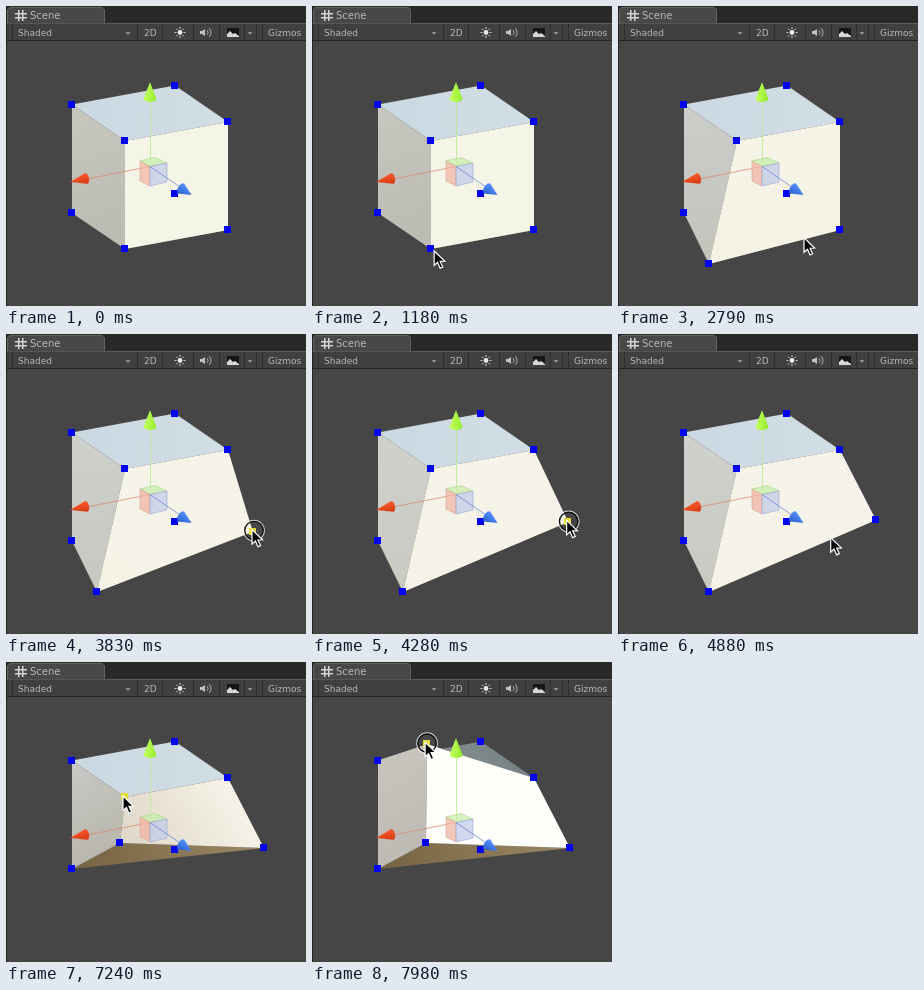
An HTML page with a canvas for the animation above (8 s loop, 300 by 300 pixels).

```html
<!DOCTYPE html>
<html lang="en">
<head>
<meta charset="utf-8">
<title>Scene</title>
<style>
html, body { margin: 0; width: 100%; height: 100%; overflow: hidden; background: #464646; }
canvas { display: block; width: 300px; height: 300px; }
</style>
</head>
<body>
<canvas id="stage" width="300" height="300"></canvas>
<script>
const ctx = document.getElementById('stage').getContext('2d');
const LOOP = 8000, START = 725, STEP = 147.5;

const cube = {
  A: [66, 98.5], B: [169, 79.5], C: [222, 116], D: [119, 135],
  E: [66, 207], F: [119, 243], G: [222, 224], H: [169, 188],
};

// The cursor leaves, reaches a corner, presses it and pulls it until the end step.
const drags = [
  { corner: 'F', from: cube.F, to: [91, 258], leave: 0, reach: 4, press: 5, end: 10 },
  { corner: 'G', from: cube.G, to: [258, 186], leave: 10, reach: 16, press: 17, end: 26 },
  { corner: 'F', from: [91, 258], to: [114, 181], bow: 13, leave: 26, reach: 32, press: 33, end: 39 },
  { corner: 'D', from: cube.D, to: [115, 80], leave: 40, reach: 44, press: 45, end: 50 },
];
const CURSOR_ENTRY = [152, 262];

// Colours of both ends of each face's gradient, before and after each drag.
const shades = {
  top: [['#cad8e1', '#cad8e1', '#cad8e1', '#cad8e1', '#84908f'], ['#d2dee6', '#d2dee6', '#d2dee6', '#d2dee6', '#717d80']],
  left: [['#c7c6bf', '#cccecb', '#cfd1cd', '#c8c9c6', '#c6c4bd'], ['#bbbab2', '#c3c3bb', '#c9cac2', '#b9b7ad', '#bdbbb4']],
  front: [['#f5f5e7', '#f3f2e4', '#f5f3e7', '#ded6c8', '#fffffb'], ['#f5f5e7', '#f5f4e6', '#f6f4ea', '#f7f3e8', '#fffffc']],
  bottom: [['#766343'], ['#9b8864']],
};

const clamp = u => Math.min(1, Math.max(0, u));
const smooth = u => u * u * (3 - 2 * u);
const easeOut = u => 1 - (1 - u) ** 2;
const mix = (a, b, u) => a.map((v, i) => v + (b[i] - v) * u);
const rgb = hex => [1, 3, 5].map(i => parseInt(hex.slice(i, i + 2), 16));

const progress = (drag, step) => easeOut(clamp((step - drag.press) / (drag.end - drag.press)));

function dragged(drag, step) {
  const u = progress(drag, step), [x, y] = mix(drag.from, drag.to, u);
  return [x + (drag.bow || 0) * Math.sin(Math.PI * u), y];
}

function cursorAt(step) {
  const index = drags.findLastIndex(d => step >= d.leave);
  const drag = drags[index];
  const origin = index ? drags[index - 1].to : CURSOR_ENTRY;
  const travel = smooth(clamp((step - drag.leave) / (drag.reach - drag.leave)));
  const [x, y] = mix(origin, dragged(drag, step + 0.25), travel);
  return [x - 2, y - 1];
}

function stageColor(colors, stage) {
  const last = colors.length - 1, i = Math.min(Math.floor(stage), last);
  const color = mix(rgb(colors[i]), rgb(colors[Math.min(i + 1, last)]), stage % 1);
  return `rgb(${color.map(Math.round)})`;
}

function trace(points) {
  ctx.beginPath();
  points.forEach(p => ctx.lineTo(...p));
}
function polygon(points, fill, stroke, width = 1) {
  trace(points);
  ctx.closePath();
  ctx.fillStyle = fill;
  ctx.fill();
  if (stroke) { ctx.strokeStyle = stroke; ctx.lineWidth = width; ctx.stroke(); }
}
function line(points, color, width = 1) {
  trace(points);
  ctx.strokeStyle = color;
  ctx.lineWidth = width;
  ctx.stroke();
}
function arc(x, y, r, color, width, from = 0, to = 7) {
  ctx.beginPath();
  ctx.arc(x, y, r, from, to);
  ctx.strokeStyle = color;
  ctx.lineWidth = width;
  ctx.stroke();
}
function rect(x, y, w, h, color) {
  ctx.fillStyle = color;
  ctx.fillRect(x, y, w, h);
}
function text(label, x, y, size) {
  ctx.font = `${size}px "DejaVu Sans", sans-serif`;
  ctx.fillStyle = '#b8b8b8';
  ctx.fillText(label, x, y);
}
function gradient(from, to, colors) {
  const g = ctx.createLinearGradient(...from, ...to);
  colors.forEach((color, i) => g.addColorStop(i, color));
  return g;
}

function drawToolbar() {
  rect(0, 0, 300, 18, '#292929');
  rect(0, 17, 300, 18, '#404040');
  rect(0, 17, 300, 1, '#5c5c5c');
  polygon([[1.5, 18], [1.5, 3.5], [3.5, 1.5], [96.5, 1.5], [98.5, 3.5], [98.5, 18]], '#484848', '#626262');
  rect(0, 18, 300, 16, '#404040');
  rect(0, 34, 300, 1, '#242424');
  rect(0, 0, 1, 300, '#222');
  for (const x of [6, 131, 156, 187, 213, 238, 250, 256]) rect(x, 18, 1, 16, '#2e2e2e');

  for (const offset of [0, 4]) {
    rect(12 + offset, 4, 1.5, 11, '#d4d4d4');
    rect(9, 7 + offset, 12, 1.5, '#d4d4d4');
  }
  text('Scene', 24, 13, 10);
  text('Shaded', 12, 30, 9);
  text('2D', 138, 30, 9);
  text('Gizmos', 262, 30, 9);
  for (const x of [122, 244]) polygon([[x - 2.5, 26], [x + 2.5, 26], [x, 29]], '#8e8e8e');

  arc(174, 26.5, 1.2, '#eee', 2.4);
  for (let i = 0; i < 8; i++) {
    const ray = r => [174 + r * Math.cos(i * Math.PI / 4), 26.5 + r * Math.sin(i * Math.PI / 4)];
    line([ray(3.5), ray(5.5)], '#d0d0d0');
  }
  polygon([[194, 25], [196, 25], [199, 23], [199, 30], [196, 28], [194, 28]], '#c0c0c0');
  for (const r of [3, 6]) arc(199, 26.5, r, '#b4b4b4', 1, -0.8, 0.8);
  rect(221, 22, 12, 9, '#161616');
  polygon([[221, 31], [221, 28], [224, 25], [227, 28], [229, 27], [233, 30], [233, 31]], '#d8d8d8');
}

function cone(tip, base, radius, colors) {
  const dx = tip[0] - base[0], dy = tip[1] - base[1];
  ctx.save();
  ctx.translate(...base);
  ctx.rotate(Math.atan2(dy, dx));
  ctx.beginPath();
  ctx.moveTo(Math.hypot(dx, dy), 0);
  ctx.ellipse(0, 0, 3, radius, 0, Math.PI / 2, Math.PI * 1.5);
  ctx.closePath();
  ctx.fillStyle = gradient([0, -radius], [0, radius], colors);
  ctx.fill();
  ctx.restore();
}

function drawGizmo() {
  const center = [144, 160.5];
  line([[144.5, 160], [144.5, 94]], '#bce98a', 0.8);
  line([center, [81, 173]], '#dc8878', 0.8);
  polygon([[134, 155], [149, 151.5], [161, 157], center], 'rgba(200,238,172,.75)', '#a9d488', 0.6);
  polygon([[134, 155], center, [144, 180], [134, 175]], 'rgba(240,180,165,.75)', '#d9a698', 0.6);
  polygon([center, [161, 157], [161, 176], [144, 180]], 'rgba(195,203,234,.75)', '#98a4d2', 0.6);
  line([center, [174, 181]], '#6c8bd6', 0.8);
  cone([144, 76], [144, 93], 6.5, ['#c6ff62', '#92ec2c']);
  cone([64, 176], [80, 172.5], 5.5, ['#d03a14', '#ff5a2c']);
  cone([185.5, 189], [175, 182.5], 6, ['#5594ff', '#2a5fd0']);
}

function drawCursor([x, y], pressed) {
  if (pressed) {
    arc(x + 2, y + 1, 10.3, 'rgba(255,255,255,.75)', 1.2);
    arc(x + 2, y + 1, 9.2, '#111', 1.4);
  }
  const arrow = [[0, 0], [0, 14.5], [3.4, 11.4], [6, 17.2], [8.6, 16], [6, 10.4], [10.6, 10.2]];
  polygon(arrow.map(([dx, dy]) => [x + dx, y + dy]), '#000', '#fff', 1.2);
}

function draw(time) {
  const step = Math.floor((time - START) / STEP);
  const corners = { ...cube };
  for (const drag of drags) {
    if (step >= drag.press) corners[drag.corner] = dragged(drag, step);
  }
  const { A, B, C, D, E, F, G } = corners;
  const stage = drags.reduce((sum, drag) => sum + progress(drag, step), 0);
  const face = (points, from, to, ends) =>
    polygon(points, gradient(from, to, ends.map(colors => stageColor(colors, stage))));

  rect(0, 0, 300, 300, '#464646');
  drawToolbar();
  face([A, B, C, D], A, C, shades.top);
  face([E, F, G], E, G, shades.bottom);
  face([A, D, F, E], A, F, shades.left);
  face([D, C, G, F], F, C, shades.front);

  const active = drags.find(d => step >= d.reach && step < d.end);
  for (const name in corners) {
    const [x, y] = corners[name];
    rect(Math.round(x - 4), Math.round(y - 4), 7, 7, active?.corner === name ? '#e6dc3c' : '#0000f5');
  }
  drawGizmo();
  if (step >= 0) drawCursor(cursorAt(step), active && step > active.press);
}

let start;
function tick(now) {
  start ??= now;
  draw((now - start) % LOOP);
  requestAnimationFrame(tick);
}
requestAnimationFrame(tick);
</script>
</body>
</html>
```
